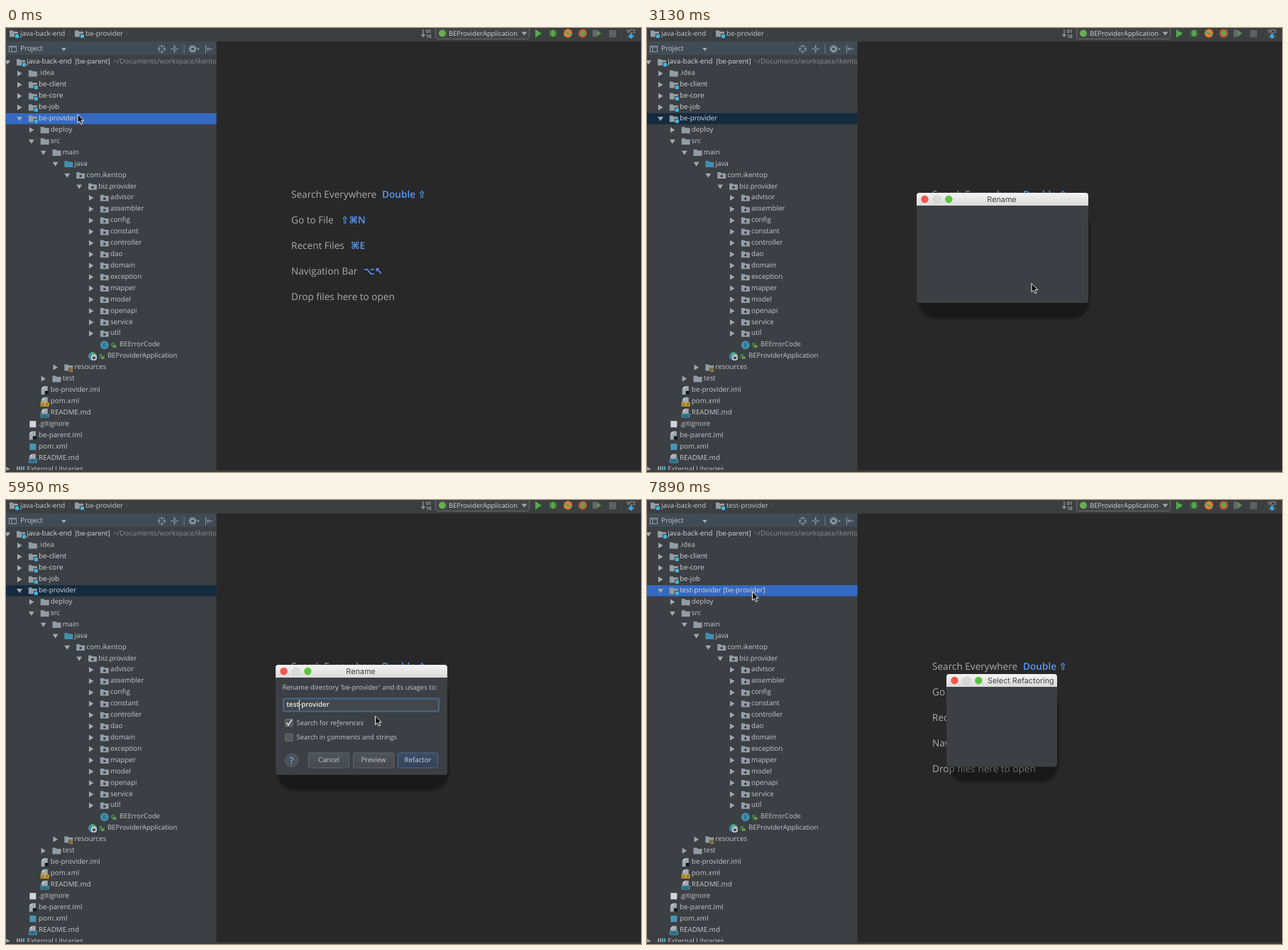
An HTML page that plays this animation: 895x625 px, repeating every 8 s.

```html
<!DOCTYPE html>
<html lang="en">
<head>
<meta charset="utf-8">
<title>Renaming a directory</title>
<style>
html, body { margin: 0; width: 100%; height: 100%; overflow: hidden; background: #282828; }
svg { display: block; width: 895px; height: 625px; }
text { font-family: "Open Sans", "DejaVu Sans", sans-serif; font-weight: 500; white-space: pre; text-rendering: geometricPrecision; }
.title { font-family: Inter, "Liberation Sans", sans-serif; font-weight: 400; }
.b { font-weight: 600; }
.u { text-decoration: underline; }
</style>
</head>
<body>
<svg id="stage" viewBox="0 0 895 625" xmlns="http://www.w3.org/2000/svg"></svg>
<script>
const GRAY = '#929ca5', INK = '#c6c8ca', BLUE = '#5b98f4', TEAL = '#3f8fad';

const rect = (x, y, w, h, fill, more = '') =>
  `<rect x="${x}" y="${y}" width="${w}" height="${h}" fill="${fill}" ${more}/>`;
const circle = (x, y, r, fill, more = '') => `<circle cx="${x}" cy="${y}" r="${r}" fill="${fill}" ${more}/>`;
const path = (d, fill, more = '') => `<path d="${d}" fill="${fill}" ${more}/>`;
const line = (d, color, w = 1) => path(d, 'none', `stroke="${color}" stroke-width="${w}"`);
const text = (x, y, s, fill = INK, size = 9.8, more = '') =>
  `<text x="${x}" y="${y}" fill="${fill}" font-size="${size}" ${more}>${s}</text>`;
const at = (x, y, body) => `<g transform="translate(${x} ${y})">${body}</g>`;
const mid = 'text-anchor="middle"', bold = 'class="b"';
const u = c => `<tspan class="u">${c}</tspan>`;

// Icons are drawn around their centre
const folder = (c = GRAY) => path('M-6-4.5h4.5l1.5 1.5h6v7.5h-12z', c);
const page = path('M-1-6h5v12h-9v-8z', '#a3abb1') + path('M-5-2.5h3.5V-6z', '#d5d9dc');
const icon = {
  folder: folder(),
  module: folder() + rect(1, 0, 6, 6, '#3c3f41') + rect(2, 1, 5, 5, '#40b6e0'),
  src: folder(TEAL),
  pkg: folder() + circle(0, 1, 1.7, '#32363a'),
  res: folder() + rect(0, 0, 7, 6, '#3c3f41') + line('M1 1h5M1 3.2h5M1 5.4h5', '#c9963c', 1.2),
  enum: circle(0, 0, 6, TEAL) + text(0, 2.7, 'E', '#23414c', 7.5, mid),
  app: circle(0, 0, 6, TEAL) + path('M-2-6l8 4-6 3z', '#62b543') + circle(2, 2, 4, '#d5d9dc') +
    circle(2, 2, 2.4, '#3c3f41') + line('M2-1v3', '#d5d9dc'),
  iml: page + rect(0, 1, 5, 5, '#16191b'),
  xml: page + rect(-6, 1, 12, 6, '#c99a35') + line('M-2 2.3l-2 1.7 2 1.7M2 2.3l2 1.7-2 1.7', '#4f3d16'),
  md: page + rect(-6, 1, 12, 6, TEAL) + text(0, 6, 'MD', '#173742', 5.5, mid + ' ' + bold),
  git: rect(-4.5, -4.5, 9, 9, '#d2d5d7'),
  maven: rect(-4.5, -4.5, 9, 9, '#4a93b5'),
  lib: line('M-5-4v9M-2-4v9M1-4v9', GRAY, 2) + line('M4-4v9', '#40b6e0', 2)
};

// depth, icon, arrow (v open, > closed, - none), label
const rows = `0 module v java-back-end
1 folder > .idea
1 module > be-client
1 module > be-core
1 module > be-job
1 module v be-provider
2 folder > deploy
2 folder v src
3 folder v main
4 src v java
5 pkg v com.ikentop
6 pkg v biz.provider
7 pkg > advisor
7 pkg > assembler
7 pkg > config
7 pkg > constant
7 pkg > controller
7 pkg > dao
7 pkg > domain
7 pkg > exception
7 pkg > mapper
7 pkg > model
7 pkg > openapi
7 pkg > service
7 pkg > util
7 enum - BEErrorCode
6 app - BEProviderApplication
4 res > resources
3 folder > test
2 iml - be-provider.iml
2 xml - pom.xml
2 md - README.md
1 git - .gitignore
1 iml - be-parent.iml
1 maven - pom.xml
1 md - README.md
0 lib > External Libraries`.split('\n').map(r => r.match(/(\d) (\w+) (.) (.*)/).slice(1));

const lock = line('M-3 2v-3a1.5 1.5 0 0 1 3 0v2', '#5fa04a', 1.1) + rect(-1.5, .5, 5, 3.5, '#5fa04a');

function treeRow([depth, kind, arrow, label], i) {
  const x = 2.2 + depth * 16.83, y = 47 + i * 15.92;
  const java = kind === 'enum' || kind === 'app';
  const mark = { v: 'M-4-2.5h8l-4 6z', '>': 'M-3-4l6.5 4-6.5 4z' }[arrow];
  return (mark ? at(x, y + 1, path(mark, '#a4a8ab')) : '') +
    at(x + 18.8, y + 1.2, icon[kind]) +
    (java ? at(x + 32, y + 1, lock) : '') +
    text(x + (java ? 40 : 27), y + 3.4, label, kind === 'module' ? '#d6d8da' : INK, java ? 9.5 : 9.8,
      i === 5 ? 'id="module"' : '');
}

function toolbar() {
  const bug = c => line('M-5-4l10 8M-5 4l10-8M-6 0h12', c) + path('M0-5a3.5 5 0 0 1 0 10a3.5 5 0 0 1 0-10', c);
  return rect(0, 0, 895, 19, '#3c3f41') +
    at(11, 8, icon.module) + text(20, 10.5, 'java-back-end') + line('M88 4l3 4-3 4', '#54585b') +
    at(103, 8, icon.module) + text(112, 10.5, 'be-provider', INK, 9.8, 'id="crumb"') +
    `<g id="chevron">${line('M0 4l3 4-3 4', '#54585b')}</g>` +
    line('M588 2v10m-2.5-3l2.5 3 2.5-3', GRAY, 1.3) +
    text(592, 6.5, '01', INK, 6.5, bold) + text(592, 13.5, '10', INK, 6.5, bold) +
    rect(605.5, -2.5, 132, 18, '#414547', 'rx="3" stroke="#686b6d"') + circle(615, 7.5, 5, '#6aad4f') +
    text(624, 11, 'BEProviderApplication', '#d0d2d4', 9.4) + path('M726.5 5.5h8l-4 5z', '#a4a8ab') +
    path('M746 2l9 5.7-9 5.8z', '#4fae4a') + at(771, 7.5, bug('#57a64a')) +
    circle(792, 7.5, 6, '#d9823b') + line('M787 5l10 5', '#6d9c4c', 2) +
    circle(813, 7.5, 6, '#c75b32') + at(813, 7.5, `<g transform="scale(.75)">${bug('#65a34b')}</g>`) +
    at(833, 7.5, line('M-5-5v10M-2.5-5v10', '#7c8387', 1.5) + path('M-1-5l7 5-7 5z', '#628a5a')) +
    rect(850, 3, 10, 10, '#5d6062') +
    text(881, 6.5, 'VCS', INK, 7, mid) + path('M879 8h4v3h3l-5 4.5-5-4.5h3z', '#4d9ed0');
}

function sidebar() {
  return rect(0, 19, 296.5, 606, '#3c3f43') + rect(0, 19, 296.5, 19, '#414b55') +
    rect(4.5, 25.5, 10, 8, 'none', 'stroke="#8f9aa3"') + line('M4 27h11M8 27v7', GRAY) +
    text(20, 32.3, 'Project') + path('M78 28h7l-3.5 4.5z', '#a4a8ab') +
    circle(219.5, 29.5, 4.5, 'none', 'stroke="#8f9aa3" stroke-width="1.2"') +
    line('M219.5 24v4m0 3v4M214 29.5h4m3 0h4', GRAY) +
    line('M232 29.5h11M237.5 24v4m-2-2l2 2 2-2M237.5 35v-4m-2 2l2-2 2 2', GRAY) +
    line('M251 23v13', '#777f86') +
    circle(263, 29.5, 3.2, 'none', 'stroke="#8f9aa3" stroke-width="2.2"') +
    circle(263, 29.5, 4.9, 'none', 'stroke="#8f9aa3" stroke-width="1.4" stroke-dasharray="2 1.85"') +
    path('M269 28.5h4l-2 2.5z', GRAY) + line('M281.5 24v11M283 29.5h8m-5-2.5l-3 2.5 3 2.5', GRAY) +
    `<g clip-path="url(#tree)">${rect(0, 120, 297, 15.5, '#346ac4', 'id="mark"')}` +
    rows.map(treeRow).join('') +
    text(97.5, 50.4, '[be-parent]', '#d6d8da', 9.4) +
    text(151, 50.4, '~/Documents/workspace/ikentop', '#8b8e91') + '</g>';
}

function welcome() {
  return [['Search Everywhere', 530, 'Double ⇧'], ['Go to File', 472, '⇧⌘N'], ['Recent Files', 486, '⌘E'],
    ['Navigation Bar', 504, '⌥↖'], ['Drop files here to open', 0, '']]
    .map(([label, x, keys], i) => text(402, 238.6 + i * 36, label, '#ababab', 13.6) +
      text(x, 238.6 + i * 36, keys, BLUE, 13.6, bold)).join('');
}

function dialog(id, x, y, w, h, title, body) {
  return `<g id="${id}">` +
    rect(x + 2, y + 20, w, h + 2, '#000', 'rx="26" opacity=".36" filter="url(#soft)"') +
    rect(x, y, w, h, '#3c3f43', 'rx="4"') +
    path(`M${x} ${y + 18}v-14q0-4 4-4h${w - 8}q4 0 4 4v14z`, 'url(#bar)') +
    circle(x + 11.5, y + 9, 5.2, '#f4574e') + circle(x + 28.5, y + 9, 4.8, '#dcdcdc', 'stroke="#c4c4c4"') +
    circle(x + 45.3, y + 9, 5.2, '#56c83c') + title + `<g id="${id}Body">${body}</g></g>`;
}

const button = (x, y, w, label, look, id = '') => {
  const [fill, edge, ink] = {
    plain: ['url(#btn)', '#63676a', INK], main: ['url(#mainBtn)', '#50698c', '#d0d6df'], off: ['none', '#55585c', '#777a7d']
  }[look];
  return `<g ${id && `id="${id}"`}>` + rect(x + .5, y + .5, w - 1, 21, fill, `rx="2" stroke="${edge}"`) +
    text(x + w / 2, y + 13.2, label, ink, 9.7, mid) + '</g>';
};
const help = (x, y) => circle(x, y, 9.3, '#4b5156', 'stroke="#5d6468"') +
  text(x, y + 5, '?', '#5aa5d6', 14, mid + ' ' + bold);
const radio = (x, y, on) => on
  ? circle(x, y, 6, '#4c5459', 'stroke="#49729f" stroke-width="2.4"') + circle(x, y, 1.8, '#c8cacc')
  : circle(x, y, 5.5, '#55595c', 'stroke="#686c6f"');
const check = (x, y, on) => rect(x - 5, y - 5, 10.5, 10.5, '#55595c', 'rx="1" stroke="#6c7073"') +
  (on ? line(`M${x - 3} ${y}l2.5 3.5 5-8`, '#d5d7d8', 1.6) : '');

const refactoring = dialog('choose', 422, 245, 156, 130.5,
  text(480, 258.2, 'Select Refactoring', '#444', 10.8, 'class="title"'),
  text(432, 279, 'What would you like to do?', INK, 9.4) +
  radio(440, 302.5, true) + text(452, 305.2, `Rename ${u('d')}irectory`, INK, 9.6) +
  radio(440, 323.5, false) + text(452, 326.4, `Rename ${u('m')}odule`, INK, 9.6) +
  help(445, 355) + button(460.5, 344, 50, 'Cancel', 'plain') + button(516, 344, 50, 'OK', 'main'));

const rename = dialog('rename', 380, 232, 242, 155,
  text(500, 245.3, 'Rename', '#444', 10.8, 'class="title" ' + mid),
  `<g clip-path="url(#prompt)">${text(389.5, 266.8, "Rename directory 'be-provider' and its usages to:", INK, 9.6)}</g>` +
  rect(391, 279.5, 219, 18, '#43474a', 'rx="1.5" stroke="#42688f" stroke-width="2"') +
  text(395.3, 291.2, '', '#eceded', 9.7, bold + ' id="field"') + rect(0, 281, 1, 15, '#d8d8d8', 'id="caret"') +
  check(398.5, 313.5, true) + text(409.5, 317, `Search for re${u('f')}erences`, INK, 9.5) +
  check(398.5, 334, false) + text(409.5, 337.2, `Search in ${u('c')}omments and strings`, INK, 9.5) +
  help(402.5, 366.5) + button(426, 355.5, 58, 'Cancel', 'plain') +
  button(489, 355.5, 58, 'Preview', 'off', 'previewOff') + button(552, 355.5, 57, 'Refactor', 'off', 'refactorOff') +
  button(489, 355.5, 58, 'Preview', 'plain', 'previewOn') + button(552, 355.5, 57, 'Refactor', 'main', 'refactorOn'));

const fade = (id, top, bottom) => `<linearGradient id="${id}" x2="0" y2="1"><stop stop-color="${top}"/>
  <stop offset="1" stop-color="${bottom}"/></linearGradient>`;

const $ = id => document.getElementById(id);
$('stage').innerHTML = `<defs>${fade('bar', '#f3f3f3', '#d9d9d9')}${fade('btn', '#4f5458', '#45494d')}
  ${fade('mainBtn', '#3b4c66', '#344259')}
  <filter id="soft" x="-20%" y="-20%" width="140%" height="140%"><feGaussianBlur stdDeviation="1.5"/></filter>
  <clipPath id="tree">${rect(0, 38, 296.5, 584.5, '#000')}</clipPath>
  <clipPath id="prompt">${rect(380, 250, 231.5, 26, '#000')}</clipPath></defs>` +
  rect(0, 0, 895, 625, '#282828') + sidebar() + toolbar() + welcome() + rect(0, 622.5, 895, 2.5, '#3c3f41') +
  refactoring + rename +
  path('M0 0v12.2l2.8-2.6 2 4.6 2.2-1-2-4.4h3.8z', '#0a0a0a', 'stroke="#f2f2f2" stroke-width="1" id="pointer"');

const show = (id, on) => $(id).setAttribute('display', on ? 'inline' : 'none');
const put = (id, x, y) => $(id).setAttribute('transform', `translate(${x} ${y})`);
const write = (id, s) => { if ($(id).textContent !== s) $(id).textContent = s; };

// Number of the n even steps between start and end already taken
const steps = (t, start, end, n) =>
  t < start ? 0 : Math.min(n, 1 + Math.floor((t - start) / (end - start) * (n - 1) + .01));

// start, end, steps, x, y
const moves = [[1350, 1790, 4, 459, 314], [2090, 2390, 3, 542, 359.5], [3580, 3870, 3, 520.5, 304], [6700, 7440, 6, 148.5, 129]];

function pointer(t) {
  let x = 101, y = 121.5;
  for (const [start, end, n, toX, toY] of moves) {
    const k = steps(t, start, end, n) / n;
    x += (toX - x) * k;
    y += (toY - y) * k;
    if (k < 1) break;
  }
  return [x, y];
}

function draw(t) {
  const renamed = t >= 6700, busy = t >= 1050 && t < 6400, typed = steps(t, 5360, 5950, 5);
  $('mark').setAttribute('fill', busy ? '#142b40' : '#346ac4');
  write('module', renamed ? 'test-provider [be-provider]' : 'be-provider');
  write('crumb', renamed ? 'test-provider' : 'be-provider');
  put('chevron', 115.5 + $('crumb').getComputedTextLength(), 0);

  show('choose', t >= 1050 && t < 3130 || t >= 7890);
  show('chooseBody', t < 7890);
  show('rename', t >= 3130 && t < 6400);
  show('renameBody', t >= 3280);

  const head = typed ? 'test'.slice(0, typed - 1) : 'be';
  write('field', head + '-provider');
  const place = typed ? head.length : t < 4470 ? 11 : t < 4920 ? 3 : 2;
  if (t >= 3280 && t < 6400)
    $('caret').setAttribute('x', 395 + (place ? $('field').getSubStringLength(0, place) : 0));
  show('caret', t < 3580 || t >= 4320);
  for (const b of ['preview', 'refactor']) {
    show(b + 'On', typed > 0);
    show(b + 'Off', !typed);
  }
  put('pointer', ...pointer(t));
}

function tick(now) {
  draw(now % 8000);
  requestAnimationFrame(tick);
}
draw(0);
requestAnimationFrame(tick);
</script>
</body>
</html>
```
